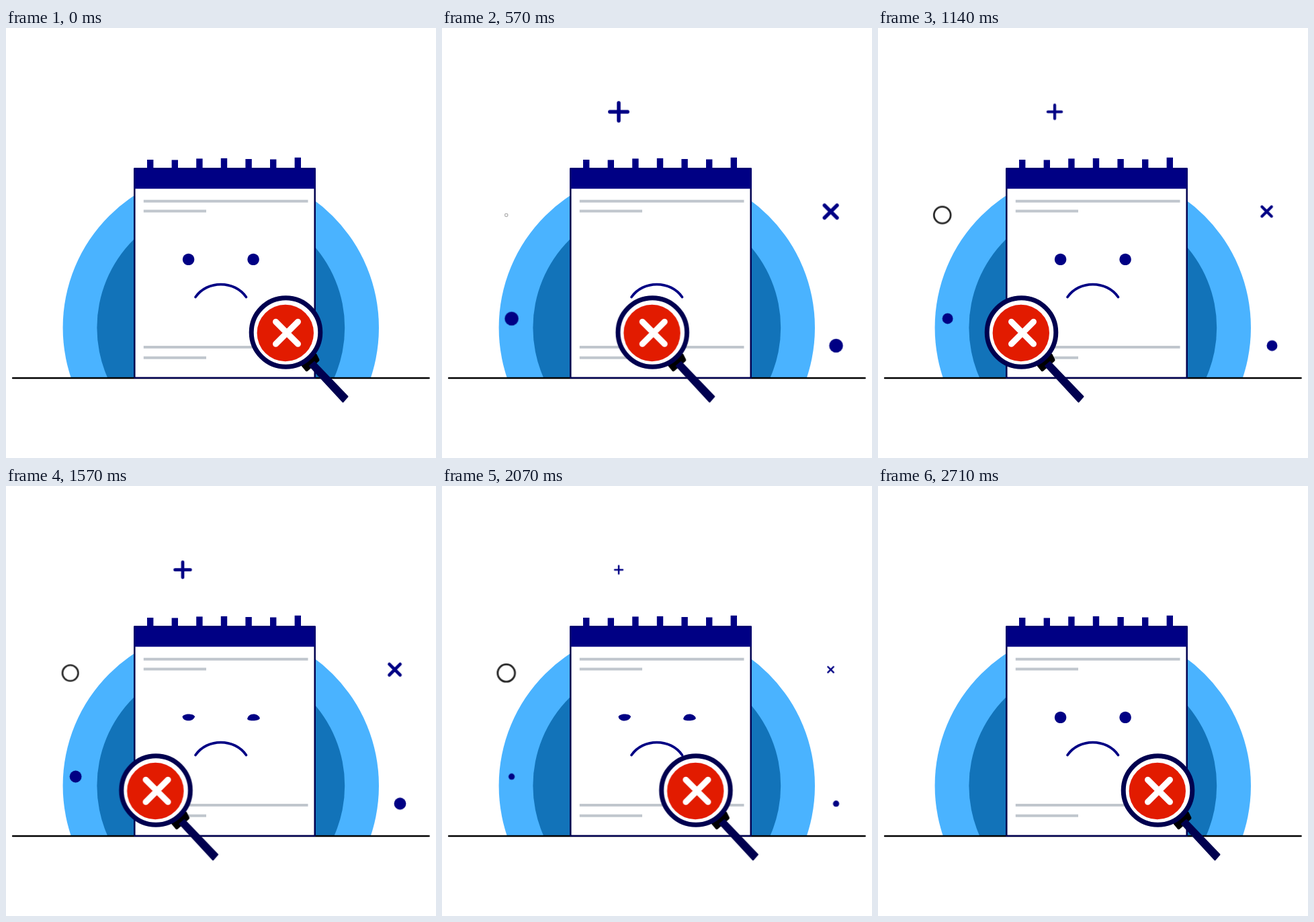
An HTML page that plays this animation: 640 by 640 pixels, repeating every 2870 ms.

```html
<!DOCTYPE html>
<html lang="en">
<head>
<meta charset="utf-8">
<title>Sad notepad</title>
<style>
html, body { margin: 0; width: 100%; height: 100%; overflow: hidden; background: #fff; }
svg { display: block; width: 100vw; height: 100vh; }
.mark { fill: none; stroke: #000084; stroke-width: 5.5; stroke-linecap: round; }
.blue { fill: #000084; }
</style>
</head>
<body>
<svg viewBox="0 0 640 640">
  <clipPath id="horizon"><rect width="640" height="521"/></clipPath>
  <g clip-path="url(#horizon)">
    <circle cx="319.8" cy="446" r="235.2" fill="#4ab3ff"/>
    <circle cx="319.8" cy="446" r="184.4" fill="#1273b9"/>
  </g>

  <g transform="translate(263 124.7)"><path class="mark pop" d="M-13.2 0H13.2M0-13.2V13.2"/></g>
  <g transform="translate(578.6 273.2)"><path class="mark pop" d="M-9.3-9.3L9.3 9.3M9.3-9.3L-9.3 9.3"/></g>
  <g transform="translate(103.6 432.5)"><circle class="blue pop" r="10.3"/></g>
  <g transform="translate(586.5 472.8)"><circle class="blue pop" r="10.3"/></g>
  <g transform="translate(95.7 278.4)"><circle id="hoop" r="12.6" fill="none" stroke="#262626" stroke-width="2.8"/></g>

  <path d="M10.2 521H629.5" stroke="#000" stroke-width="2.6" stroke-linecap="round"/>
  <rect x="191.3" y="209.5" width="268.4" height="311.2" fill="#fff" stroke="#00004f" stroke-width="2.5" stroke-linejoin="round"/>
  <path class="blue" d="M191.3 209.5H459.7V239.2H191.3Z"/>
  <path d="M191.3 239V209.5H459.7V239" fill="none" stroke="#000070" stroke-width="2.5" stroke-linejoin="round"/>
  <g id="binding" class="blue"></g>
  <path d="M204.8 257.8H449.5M204.8 272.6H298M204.8 475H449.5M204.8 490.7H298" stroke="#c0c6cd" stroke-width="4"/>

  <g class="blue">
    <g transform="translate(271.6 344.4)"><path id="leftEye"/></g>
    <g transform="translate(368.1 344.4)"><path id="rightEye"/></g>
  </g>
  <path d="M282 400.5C299.5 375.2 340 375.2 357.5 400.5" fill="none" stroke="#000084" stroke-width="3.7" stroke-linecap="round"/>

  <g id="lens">
    <path d="M442 502L460.5 487L464 494L447.5 508.5Z" stroke="#000" stroke-width="5" stroke-linejoin="round"/>
    <path d="M452 503L459 497L508.5 548.5L501.5 556.5Z" fill="#00004f" stroke="#00004f" stroke-width="2" stroke-linejoin="round"/>
    <circle cx="416.5" cy="453" r="51.3" fill="#fff" stroke="#00004f" stroke-width="7"/>
    <circle cx="415.8" cy="454" r="42.2" fill="#e21b00"/>
    <path d="M401.5 437.3L434.5 470.3M434.5 437.3L401.5 470.3" stroke="#fff" stroke-width="9" stroke-linecap="round"/>
  </g>
</svg>
<script>
const LOOP = 2870, STEP = 1000 / 14, LAST = 39;
const $ = id => document.getElementById(id);
const tracks = [];

// keys: [time in ms, value, easing towards the next key]
function track(el, property, keys) {
  const all = [[0, keys[0][1]], ...keys, [LOOP, keys.at(-1)[1]]];
  const frames = all.map(([ms, value, easing = 'linear']) =>
    ({ offset: ms / LOOP, [property]: value, easing }));
  const animation = el.animate(frames, { duration: LOOP, fill: 'both' });
  animation.pause();
  tracks.push(animation);
}

const scaled = keys => keys.map(([ms, s, easing]) => [ms, `scale(${s})`, easing]);

$('binding').innerHTML = [196, 196.4, 194.4, 193.9, 195, 195.5, 192.8]
  .map((top, i) => `<rect x="${210 + i * 36.6}" y="${top}" width="9.4" height="${211 - top}"/>`).join('');

const glide = 'cubic-bezier(.6,0,.4,1)';
const home = 'translateX(0px)', away = 'translateX(-203px)';
track($('lens'), 'transform', [[0, home, glide], [1135, away], [1352, away, glide], [2459, home]]);

const soft = 'ease-in-out';
for (const el of document.querySelectorAll('.pop')) {
  track(el, 'transform', scaled([
    [80, 0, soft], [580, 1, soft], [870, .77], [1400, .77, soft], [1780, 1, soft], [2330, 0]
  ]));
}

track($('hoop'), 'transform', scaled([
  [480, 0], [571, .18], [643, .32], [857, .95, 'ease-out'], [985, 1.11, soft], [1143, .985],
  [1286, .965], [1430, .965, soft], [1786, .86, soft], [2071, 1.02, 'ease-out'],
  [2200, 1.11, 'ease-in'], [2500, .39], [2700, 0]
]));

const open = 'M-8.7 0C-8.7-4.8-4.8-8.7 0-8.7C4.8-8.7 8.7-4.8 8.7 0C8.7 4.8 4.8 8.7 0 8.7C-4.8 8.7-8.7 4.8-8.7 0Z';
const shut = 'M-9.5 0C-9.5 0-5 0 0 0C5 0 9.5 0 9.5 0C9.5 0 5 0 0 0C-5 0-9.5 0-9.5 0Z';

function blink(el, half) {
  const [o, h, s] = [open, half, shut].map(d => `path("${d}")`);
  track(el, 'd', [
    [80, o], [310, h], [550, s], [575, s], [857, h], [1120, o],
    [1370, o], [1570, h], [1770, s], [1790, s], [2071, h], [2340, o]
  ]);
}
blink($('leftEye'), 'M-9-1C-9-3-4-4.9 0-4.9C4-4.9 8.5-4 9.4-1.2C8 3 4 5 0 5C-4 5-8.5 3-9-1Z');
blink($('rightEye'), 'M-9 2C-8-2-5-5 0-5C5-5 8.8-2.5 9.8 1.4C8.5 4 4 4.9 0 4.9C-4 4.9-8.5 4.3-9 2Z');

function draw(now) {
  const frame = Math.min(LAST, Math.floor((now % LOOP) / STEP + .08));
  for (const animation of tracks) animation.currentTime = frame * STEP;
  requestAnimationFrame(draw);
}
draw(0);
</script>
</body>
</html>
```
